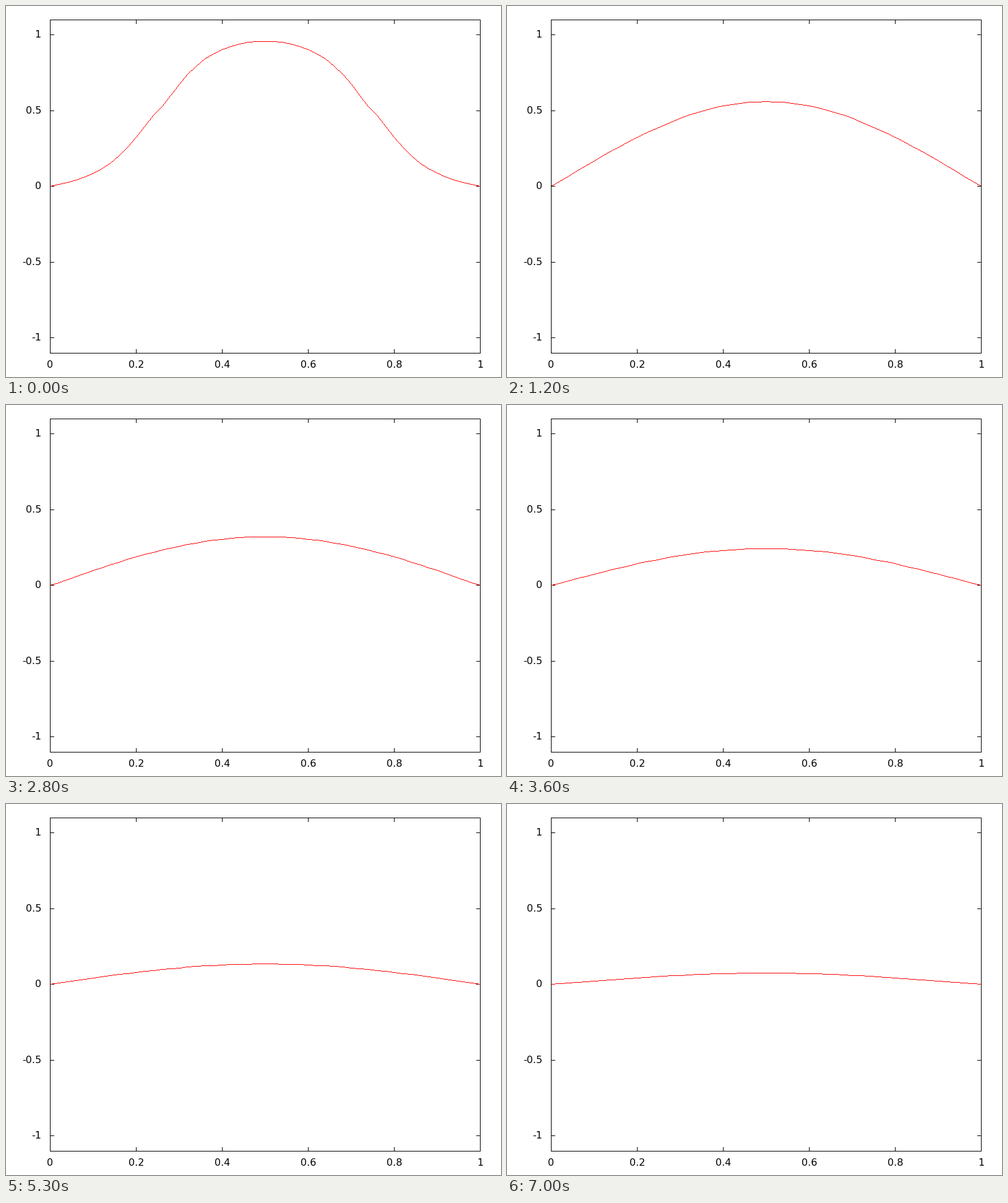
Write a matplotlib script that moves like this. It is 800 px wide and 600 px high and loops after 7100 ms.

```python
import numpy as np
import matplotlib.pyplot as plt
from matplotlib.animation import FuncAnimation
from matplotlib.patches import Rectangle

W, H = 800, 600
LEFT, RIGHT, TOP, BOTTOM = 71, 766, 22, 561
ZERO_ROW, Y_SCALE = 291, 245
TICK = 6
FRAMES, INTERVAL = 71, 100
CELLS, DT = 50, 0.003487

plt.rcParams["font.family"] = "DejaVu Sans"


def col(x):
    return LEFT + np.floor((RIGHT - LEFT) * np.asarray(x) + 0.5).astype(int)


def row(u):
    return ZERO_ROW - np.floor(Y_SCALE * np.asarray(u)).astype(int)


def solve_heat():
    """Heat equation with a box start, fixed ends, BDF2 time stepping."""
    x = np.linspace(0, 1, CELLS + 1)
    n = CELLS - 1
    lap = (np.eye(n, k=1) + np.eye(n, k=-1) - 2 * np.eye(n)) * CELLS**2
    first = np.eye(n) - DT * lap
    later = np.linalg.inv(np.eye(n) - 2 / 3 * DT * lap)

    prev = (np.abs(x[1:-1] - 0.5) < 0.25).astype(float)
    cur = np.linalg.solve(first, prev)
    states = []
    for _ in range(FRAMES):
        prev, cur = cur, later @ ((4 * cur - prev) / 3)
        states.append(np.pad(cur, 1))
    return x, states


def trace(cols, rows):
    """One-pixel red polyline on a transparent layer."""
    layer = np.zeros((H, W, 4), dtype=np.uint8)
    for x0, y0, x1, y1 in zip(cols, rows, cols[1:], rows[1:]):
        steps = max(abs(x1 - x0), abs(y1 - y0)) + 1
        px = np.rint(np.linspace(x0, x1, steps)).astype(int)
        py = np.rint(np.linspace(y0, y1, steps)).astype(int)
        layer[py, px] = (255, 0, 0, 255)
    return layer


fig = plt.figure(figsize=(W / 100, H / 100), dpi=100, facecolor="white")
ax = fig.add_axes([0, 0, 1, 1])
ax.axis("off")


def bar(x0, y0, x1, y1, z=1):
    """Black bar covering the pixels from (x0, y0) to (x1, y1)."""
    ax.add_patch(Rectangle((x0, y0), x1 - x0 + 1, y1 - y0 + 1,
                           fc="black", lw=0, antialiased=False, zorder=z))


def label(x, y, value, ha):
    ax.text(x, y, f"{value:g}", ha=ha, va="baseline",
            fontsize=11.5, color="black")


for y in (TOP, BOTTOM):
    bar(LEFT, y, RIGHT, y, 3)
for x in (LEFT, RIGHT):
    bar(x, TOP, x, BOTTOM, 3)

for value in (0, 0.2, 0.4, 0.6, 0.8, 1):
    c = int(col(value))
    bar(c, TOP, c, TOP + TICK)
    bar(c, BOTTOM - TICK, c, BOTTOM)
    label(c + 0.5, 585, value, "center")

for value in (-1, -0.5, 0, 0.5, 1):
    r = int(row(value))
    bar(LEFT, r, LEFT + TICK, r)
    bar(RIGHT - TICK, r, RIGHT, r)
    label(57, r + 5, value, "right")

grid, states = solve_heat()
curve = ax.imshow(trace(col(grid), row(states[0])), extent=(0, W, H, 0),
                  aspect="auto", interpolation="nearest", zorder=2)
ax.set_xlim(0, W)
ax.set_ylim(H, 0)


def draw(i):
    curve.set_data(trace(col(grid), row(states[i])))
    return [curve]


anim = FuncAnimation(fig, draw, frames=FRAMES, interval=INTERVAL,
                     repeat=True, repeat_delay=0)
plt.show()
```
